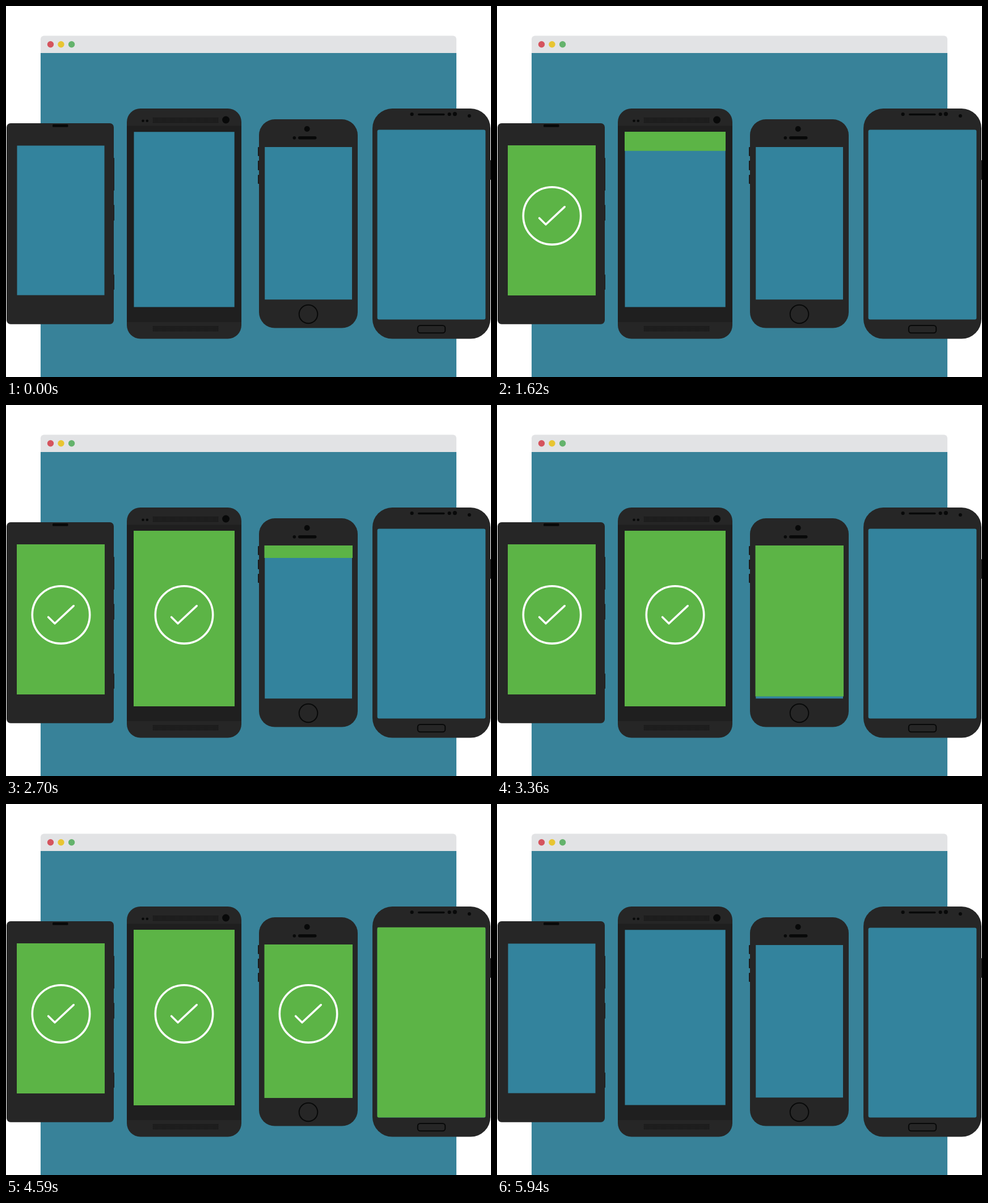
These frames come from a looping animation (855x655 px, 5970 ms). An HTML page with a canvas:

```html
<!DOCTYPE html>
<html lang="en">
<head>
<meta charset="utf-8">
<title>Devices loading</title>
<style>
  html, body { margin: 0; width: 100%; height: 100%; overflow: hidden; background: #fff; }
  canvas { display: block; }
</style>
</head>
<body>
<canvas id="stage" width="855" height="655"></canvas>
<script>
const ctx = document.getElementById('stage').getContext('2d');
const LOOP = 5970, STEP = 30;
const BODY = '#262626', BAND = '#1f1f1f', SIDE = '#1b1b1b', INK = '#080909';
const BLUE = '#33839d', GREEN = '#5cb446';

// screen: blue glass [left, top, right, bottom]; fill: green overlay
const phones = [
  { screen: [19.5, 246.5, 173.5, 510.5], fill: [19, 246, 174, 511], r: 0, cx: 97,
    start: 0, dur: 600, fade: [600, 1000] },
  { screen: [225.5, 222.2, 402.7, 531.5], fill: [225, 222, 403, 532], r: 0, cx: 314,
    start: 1610, dur: 600, fade: [2180, 2570] },
  { screen: [456.2, 249, 610, 518.3], fill: [455.5, 248, 611, 519], r: 0, cx: 533,
    start: 2686, dur: 1140, fade: [3360, 3770] },
  { screen: [654.6, 218.6, 845.3, 553.4], fill: [654.3, 217.5, 845.5, 553.8], r: 3, cx: 750.5,
    start: 3890, dur: 720, fade: [4640, 5180] }
];

const clamp = x => Math.max(0, Math.min(1, x));
const outExpo = x => x <= 0 ? 0 : x >= 1 ? 1 : 1 - 2 ** (-10 * x);
const swing = x => 0.5 - Math.cos(Math.PI * clamp(x)) / 2;

function box(color, l, t, r, b, radius = 0) {
  ctx.fillStyle = color;
  ctx.beginPath();
  ctx.roundRect(l, t, r - l, b - t, radius);
  ctx.fill();
}

function dot(color, x, y, r) {
  ctx.fillStyle = color;
  ctx.beginPath();
  ctx.arc(x, y, r, 0, Math.PI * 2);
  ctx.fill();
}

function grille(top) {
  ctx.fillStyle = '#0f0f0f';
  for (let y = top; y < top + 10; y += 2)
    for (let x = 259; x < 374; x += 2) ctx.fillRect(x, y, 1.2, 1.2);
}

function drawWindow() {
  box('#fff', 0, 0, 855, 655);
  box('#388299', 61, 83, 794, 655);
  box('#e2e3e5', 61, 52.5, 794, 83, [6, 6, 0, 0]);
  dot('#d5545e', 78.5, 67.8, 5.7);
  dot('#e8c532', 97, 67.8, 5.7);
  dot('#64b36c', 115.6, 67.8, 5.7);
}

function drawBodies() {
  for (const [t, b] of [[268, 326], [351, 379], [474, 501]]) box(SIDE, 187, t, 191, b, 1);
  box(BODY, 1, 207, 190, 561.7, 7);
  box(INK, 82, 209, 109.5, 213.8, 1.5);

  box(BODY, 213, 181, 415, 587.6, 24);
  box(BAND, 213, 211.5, 415, 558);
  dot(INK, 241.5, 202.8, 2.3);
  dot(INK, 248.8, 202.8, 2.3);
  dot(INK, 387.6, 201, 6.5);
  grille(197);
  grille(565);

  for (const [t, b] of [[249, 265], [273, 290], [298, 314]]) box(SIDE, 444, t, 448, b, 1);
  box(BODY, 446, 200, 620, 568.6, 28);
  dot(INK, 530.7, 217, 5);
  dot(INK, 508.3, 232.8, 2.8);
  box(INK, 515, 230, 547.5, 235.5, 2.75);
  ctx.strokeStyle = INK;
  ctx.lineWidth = 2;
  ctx.beginPath();
  ctx.arc(533, 544, 16.3, 0, Math.PI * 2);
  ctx.stroke();

  box(SIDE, 850, 272, 855, 307, 1);
  box(BODY, 646, 181, 854, 587.6, 35);
  dot(INK, 715.6, 191, 3.1);
  box(INK, 726, 189.8, 773.5, 193.2, 1.7);
  dot(INK, 781.6, 191, 3.1);
  dot(INK, 791.3, 190.6, 3.6);
  dot(INK, 816.8, 194, 3);
  ctx.beginPath();
  ctx.roundRect(725.8, 563.9, 48.4, 13.4, 4.5);
  ctx.stroke();

  for (const { screen, r } of phones) box(BLUE, ...screen, r);
}

function drawTick(cx, cy) {
  ctx.strokeStyle = '#fff';
  ctx.lineCap = ctx.lineJoin = 'round';
  ctx.lineWidth = 3.6;
  ctx.beginPath();
  ctx.arc(cx, cy, 50.7, 0, Math.PI * 2);
  ctx.stroke();
  ctx.beginPath();
  ctx.moveTo(cx - 22.4, cy + 4.1);
  ctx.lineTo(cx - 11, cy + 15.4);
  ctx.lineTo(cx + 22.2, cy - 15.8);
  ctx.stroke();
}

function drawProgress(t) {
  const shown = 1 - clamp((t - 5760) / 180);
  for (const { fill: [l, top, r, b], r: radius, cx, start, dur, fade } of phones) {
    const p = outExpo((t - start) / dur);
    if (!p || !shown) continue;
    ctx.save();
    ctx.globalAlpha = shown;
    ctx.beginPath();
    ctx.roundRect(l, top, r - l, b - top, radius);
    if (radius) ctx.clip();
    box(GREEN, l, top, r, top + (b - top) * p);
    ctx.globalAlpha = shown * swing((t - fade[0]) / (fade[1] - fade[0]));
    if (ctx.globalAlpha > 0) drawTick(cx, 370.4);
    ctx.restore();
  }
}

const origin = performance.now();
function frame() {
  const elapsed = (performance.now() - origin) % LOOP;
  drawWindow();
  drawBodies();
  drawProgress(Math.floor(elapsed / STEP) * STEP);
  requestAnimationFrame(frame);
}
frame();
</script>
</body>
</html>
```
